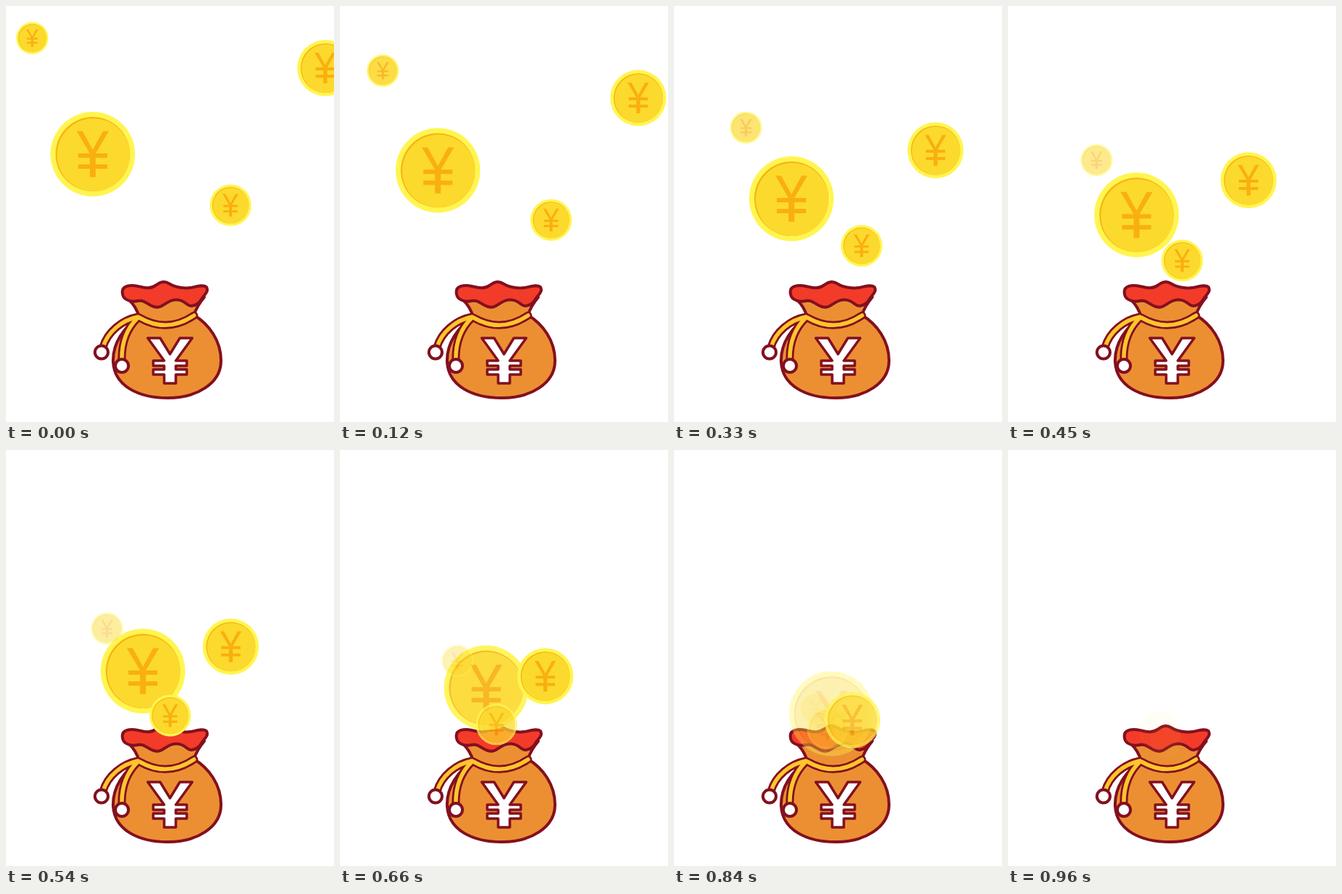
An HTML page that plays this animation: 450 px wide and 570 px high, repeating every 0.99 s.

```html
<!DOCTYPE html>
<html lang="en">
<head>
<meta charset="utf-8">
<title>Coins into a money bag</title>
<style>
  html, body { margin: 0; width: 100%; height: 100%; overflow: hidden; background: #fff; }
  svg { display: block; width: 450px; height: 570px; }
  .bag { stroke: #83101f; stroke-width: 4; stroke-linejoin: round; stroke-linecap: round; }
  .cord { fill: none; stroke-width: 11; }
  .gold { stroke: #fdc62b; stroke-width: 5.5; }
</style>
</head>
<body>
<svg viewBox="0 0 450 570">
  <defs>
    <g id="coin">
      <circle r="58" fill="#fff551"/>
      <circle r="51" fill="#f6b40f"/>
      <circle cx="1" cy="1" r="50" fill="#fcd92d"/>
      <path id="coinYen" fill="#f9af10"/>
    </g>
    <path id="cords" d="M181 426C160 430 139 446 133 468M180 428C165 443 158 462 159 487M183 427Q221 449 258 424"/>
  </defs>
  <g class="bag" fill="#ec8f33">
    <path d="M183 427C162 439 146 462 147 488C149 521 182 537 222 537S295 517 295 486C295 459 279 436 257 423Z"/>
    <path d="M168 402Q179 412 183 427Q221 447 258 423Q262 411 272 399Z"/>
    <path fill="#f33b29" d="M160 395C157 382 172 382 181 384S198 388 205 383 217 376 225 381 246 387 253 386 270 381 275 385C279 392 271 396 268 402S255 414 249 409 236 400 226 404 213 415 203 412 190 402 181 404 161 403 160 395Z"/>
    <use href="#cords" class="cord"/>
    <use href="#cords" class="cord gold"/>
    <g fill="#fff">
      <circle cx="131" cy="474.500" r="9"/>
      <circle cx="159" cy="493" r="9"/>
      <path id="bagYen" transform="translate(225 486)" stroke-width="3.5"/>
    </g>
  </g>
  <g id="coins"></g>
</svg>
<script>
const LOOP = 990, STEP = 30, TURN = 600, LAND = 960;

// Straight flight to the turn, then a second straight line into the bag.
const coins = [
  { r: 58, from: [119, 203], turn: [195.5, 314], land: [226, 385], fade: [630, 960] },
  { r: 22, from: [36, 44], turn: [150, 267], land: [217, 398], fade: [0, 990] },
  { r: 28.5, from: [308, 273], turn: [216, 374], land: [208, 385], fade: [540, 975] },
  { r: 38.5, from: [438, 85], turn: [294, 290], land: [220, 410], fade: [800, 960] }
];

// Outline of a yen sign around (0, 0): the right half, then its mirror image.
function yen({ span, arm, notch, stem, reach, bars, thick, height }) {
  const half = [[0, notch], [span - arm, -height], [span, -height]];
  for (const y of bars) half.push([stem, y], [reach, y], [reach, y + thick], [stem, y + thick]);
  half.push([stem, height]);
  const mirrored = half.map(([x, y]) => [-x, y]).reverse();
  return `M${half.concat(mirrored).join("L")}Z`;
}

function setYen(id, shape) {
  document.getElementById(id).setAttribute("d", yen(shape));
}
setYen("coinYen", { span: 22, arm: 8, notch: -6, stem: 4, reach: 20, bars: [-1, 14], thick: 6, height: 31.5 });
setYen("bagYen", { span: 30.5, arm: 17, notch: -9, stem: 8, reach: 23, bars: [0, 12], thick: 7, height: 31 });

for (const coin of coins) {
  coin.node = document.createElementNS("http://www.w3.org/2000/svg", "use");
  coin.node.setAttribute("href", "#coin");
  document.getElementById("coins").append(coin.node);
}

const mix = (a, b, amount) => a.map((value, i) => value + (b[i] - value) * amount);

function draw(elapsed) {
  const time = Math.floor(elapsed % LOOP / STEP) * STEP;
  for (const { r, from, turn, land, fade, node } of coins) {
    const [x, y] = time < TURN
      ? mix(from, turn, time / TURN)
      : mix(turn, land, (time - TURN) / (LAND - TURN));
    const opacity = (fade[1] - time) / (fade[1] - fade[0]);
    node.setAttribute("transform", `translate(${x} ${y}) scale(${r / 58})`);
    node.setAttribute("opacity", Math.min(1, Math.max(0, opacity)));
  }
}

const start = performance.now();
function tick() {
  draw(performance.now() - start);
  requestAnimationFrame(tick);
}
tick();
</script>
</body>
</html>
```
